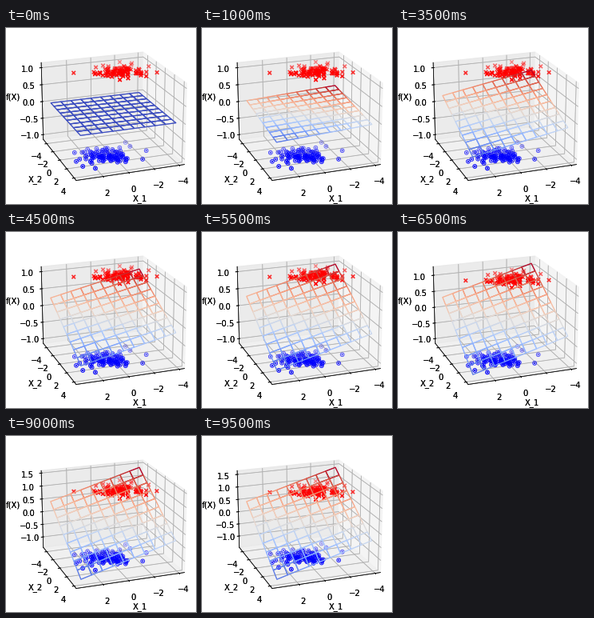
These frames come from a looping animation (238 px wide and 220 px high, 10000 ms). A matplotlib script:

```python
import numpy as np
import matplotlib.pyplot as plt
from matplotlib.animation import FuncAnimation

WIDTH, HEIGHT, DPI = 238, 220, 72
SIDE = 217.44
FRAMES, INTERVAL = 20, 500
LOW, HIGH = np.array([-3.9, -4.5]), np.array([3.5, 3.9])
FINAL_WEIGHTS = np.array([-0.24, -0.374])
RATE = 0.0425

plt.rcParams.update({"font.family": "DejaVu Sans", "font.size": 10})
rng = np.random.default_rng(4)


def cluster(center, stray, count=100):
    """Gaussian cloud with an exact mean, plus one stray point."""
    cloud = rng.normal(0, 0.95, (count, 2))
    cloud += center - cloud.mean(axis=0)
    return np.vstack([np.clip(cloud, LOW, HIGH), stray])


positive = cluster((-1.4, -1.7), stray=(2.1, -2.7))
negative = cluster((0.75, 1.5), stray=(2.85, -0.1))
grid_x, grid_y = np.meshgrid(*np.linspace(LOW, HIGH, 10).T)

fig = plt.figure(figsize=(WIDTH / DPI, HEIGHT / DPI), dpi=DPI, facecolor="white")
box = [1 - SIDE / WIDTH, 1 - SIDE / HEIGHT, SIDE / WIDTH, SIDE / HEIGHT]
# Two stacked transparent plots give the heavy lines, text and panes.
layers = [fig.add_axes(box, projection="3d", label=name) for name in ("back", "front")]


def inner_ticks(lo, hi, step):
    pad = 0.05 * (hi - lo)
    first = np.ceil((lo - pad) / step)
    last = np.floor((hi + pad) / step)
    return np.arange(first, last + 1) * step


def draw_plot(ax, plane):
    ax.clear()
    ax.patch.set_visible(False)
    ax.view_init(elev=20, azim=70)

    ax.scatter(*positive.T, 1, c="red", marker="x")
    ax.scatter(*negative.T, -1, s=22, facecolors="none", edgecolors="blue",
               linewidths=0.9)
    ax.scatter(*negative.T, -1, s=5, c="blue", linewidths=0)

    norm = plt.Normalize(plane.min(), plane.max())
    surface = ax.plot_surface(grid_x, grid_y, plane, shade=False, linewidth=1.2,
                              facecolors=plt.cm.coolwarm(norm(plane)))
    surface.set_facecolor((0, 0, 0, 0))

    ax.set_xticks(inner_ticks(LOW[0], HIGH[0], 2).astype(int))
    ax.set_yticks(inner_ticks(LOW[1], HIGH[1], 2).astype(int))
    ax.set_zticks(inner_ticks(min(-1, plane.min()), max(1, plane.max()), 0.5))
    ax.set_xlabel("X_1", labelpad=3.2)
    ax.set_ylabel("X_2")
    ax.set_zlabel("f(X)")


def draw(frame):
    # The weights approach the least-squares fit exponentially.
    w1, w2 = FINAL_WEIGHTS * (1 - np.exp(-RATE * frame))
    for ax in layers:
        draw_plot(ax, w1 * grid_x + w2 * grid_y)
    return []


anim = FuncAnimation(fig, draw, frames=FRAMES, interval=INTERVAL,
                     repeat=True, repeat_delay=0, blit=False)
plt.show()
```
